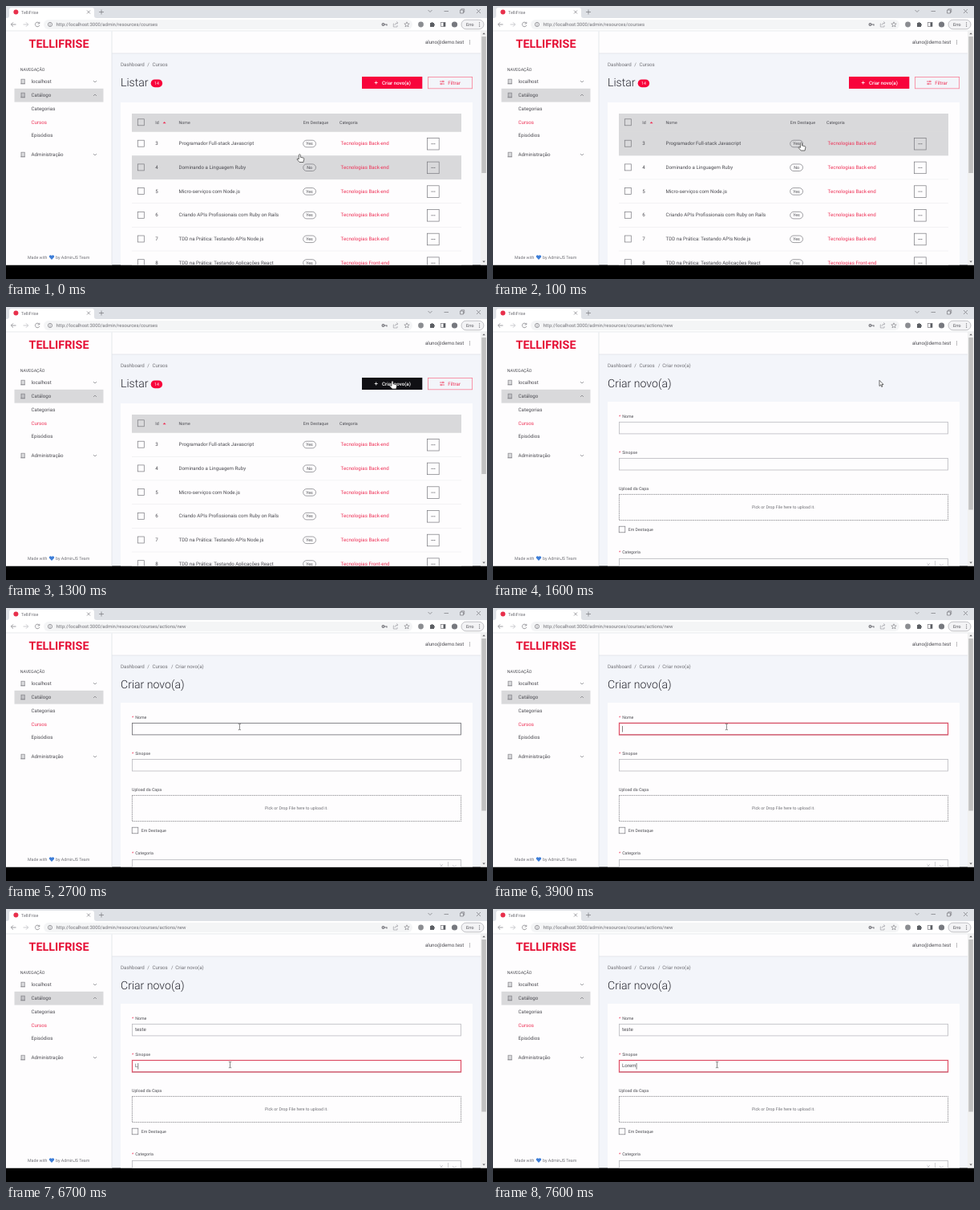
An HTML page for the animation above (8000 ms loop, 600 px wide and 340 px high).

```html
<!DOCTYPE html>
<html lang="pt">
<head>
<meta charset="utf-8">
<title>Cursos</title>
<style>
html, body { margin: 0; width: 100%; height: 100%; overflow: hidden; background: #000; }
svg { display: block; width: 600px; height: 340px; font: 6.16px Roboto, sans-serif; text-rendering: geometricPrecision; }
text { fill: #4c4c52; white-space: pre; }
.small { font-size: 5.28px; }
.title { font-size: 14.1px; font-weight: 300; fill: #26262e; }
.pale { fill: #707076; }
.red { fill: #ee3358; }
.mid { text-anchor: middle; }
.line { fill: none; stroke: #77777d; stroke-width: .7; }
.field { fill: #fefdfe; stroke: #b9b9bf; stroke-width: .8; }
.field.hover { stroke: #66666c; }
.ring { fill: none; stroke: #ee4560; }
.pointer { fill: #fff; stroke: #333; stroke-width: .7; stroke-linejoin: round; }
</style>
</head>
<body>
<svg viewBox="0 0 600 340">
  <defs>
    <clipPath id="view"><rect width="600" height="322.6"/></clipPath>
    <path id="down" class="line" d="M-2-1 0 1 2-1"/>
    <g id="doc" class="line"><rect x="-2" y="-2.8" width="4.2" height="5.6"/><path d="M-2-1H2M-2 1H2M-3 2.8H3" stroke-width=".5"/></g>
  </defs>
  <rect width="600" height="340"/>
  <g clip-path="url(#view)">
    <!-- browser window -->
    <rect width="600" height="323" fill="#f3f5fa"/>
    <rect width="600" height="16" fill="#dee1e6"/>
    <path d="M1 15Q4 15 4 12V5Q4 2 7 2H107Q110 2 110 5V12Q110 15 113 15Z" fill="#fff"/>
    <rect y="15" width="600" height="16" fill="#fff"/>
    <rect x="47" y="17" width="460" height="12" rx="6" fill="#f4f5f6"/>
    <path d="M0 31H600" stroke="#dcdde1" stroke-width=".7"/>
    <circle cx="12.4" cy="7.5" r="3" fill="#e8304c"/>
    <text class="pale" x="19" y="9.6" font-size="5.4">TelliFrise</text>
    <g class="line">
      <path d="M101 5.5 105 9.5M105 5.5 101 9.5M116 7.5H122M119 4.5V10.5"/>
      <path d="M526.5 5 529 7.5 531.5 5M546.5 6.5H552M566.5 5H570.5V9H566.5ZM567.8 5V3.8H571.7V7.7H570.5M587 4 592 9M592 4 587 9"/>
      <path d="M12.5 23H6.5M9 20.3 6.3 23 9 25.7"/>
      <path d="M21.5 23H27.5M25 20.3 27.7 23 25 25.7" stroke="#b5b7bb"/>
      <path d="M41.2 21A2.8 2.8 0 1 0 41.8 24M41.8 19.8V22H39.5"/>
      <circle cx="55" cy="23" r="2.6"/><path d="M55 22.5V24.6M55 21V21.7"/>
      <circle cx="470.5" cy="23" r="1.4" stroke-width="1.2"/><path d="M472 23H475V24.5" stroke-width="1.2"/>
      <path d="M484 22H483.3V26H488V24M485 24Q485 21 488.7 21M487.2 19.4 488.9 21 487.2 22.6" stroke="#a0a0a6"/>
      <path d="M500 19.8 500.9 22 503.2 22.1 501.4 23.6 502 25.9 500 24.6 498 25.9 498.6 23.6 496.8 22.1 499.1 22Z" stroke-width=".6"/>
      <rect x="542.5" y="20.5" width="5.5" height="5"/>
      <rect x="568" y="17.2" width="28" height="11.6" rx="5.8" fill="#f3f3f5" stroke="#a9a9af"/>
    </g>
    <circle cx="517.5" cy="23" r="3.4" fill="#8b8d91"/>
    <path d="M529 21H530.5A1 1 0 1 1 532.5 21H534V22.5A1 1 0 1 1 534 24.5V26H529Z" fill="#5c5f64"/>
    <path d="M545.5 20.5H548V25.5H545.5Z" fill="#5c5f64"/>
    <circle cx="559.5" cy="23" r="3.6" fill="#77797f"/>
    <text class="small" x="574" y="25">Erro</text>
    <g fill="#66666c"><circle cx="590.6" cy="20.8" r=".6"/><circle cx="590.6" cy="23" r=".6"/><circle cx="590.6" cy="25.2" r=".6"/></g>
    <text id="url" class="pale" x="62.5" y="25.1" font-size="5.96"></text>

    <!-- sidebar and top bar -->
    <path d="M0 31.4H592V59H132V323H0Z" fill="#fefdfe"/>
    <path d="M132 31.4V323M132 59H592" fill="none" stroke="#dfe1e8" stroke-width=".8"/>
    <text class="mid" x="66" y="51.5" font-size="14.4" font-weight="700" style="fill:#e50f35">TELLIFRISE</text>
    <text class="small" x="17.7" y="80.6">NAVEGAÇÃO</text>
    <rect x="10.5" y="102.8" width="111" height="16.8" fill="#d9d9db"/>
    <use href="#doc" x="21" y="94"/><use href="#doc" x="21" y="111"/><use href="#doc" x="21" y="185"/>
    <use href="#down" x="111" y="94"/><use href="#down" x="111" y="185"/>
    <path class="line" d="M109 112 111 110 113 112"/>
    <text x="31.6" y="96.1">localhost</text>
    <text x="31.6" y="113.1">Catálogo</text>
    <text x="31.6" y="129.9">Categorias</text>
    <text x="31.6" y="146.6" class="red">Cursos</text>
    <text x="31.6" y="163.4">Episódios</text>
    <text x="31.6" y="187.1">Administração</text>
    <text class="small pale" x="27" y="315.2">Made with</text>
    <path d="M57 316 54 312.8A1.7 1.7 0 0 1 57 311.2 1.7 1.7 0 0 1 60 312.8Z" fill="#3f7fd8"/>
    <text class="small pale" x="62" y="315.2">by AdminJS Team</text>
    <text x="571.3" y="47.2" text-anchor="end">aluno@demo.test</text>
    <g fill="#66666c"><circle cx="578.5" cy="43" r=".6"/><circle cx="578.5" cy="45" r=".6"/><circle cx="578.5" cy="47" r=".6"/></g>
    <text class="pale" x="143" y="75.3">Dashboard</text><text class="pale" x="176.2" y="75.3">/</text><text class="pale" x="182.4" y="75.3">Cursos</text>

    <g id="list">
      <text class="title" x="143" y="100.3">Listar</text>
      <rect x="180.7" y="91.4" width="14.4" height="9.8" rx="4.9" fill="#f8043b"/>
      <text class="small mid" x="187.9" y="98.1" style="fill:#fff">14</text>
      <rect id="create" x="444" y="88" width="75.3" height="15"/>
      <path d="M459.7 95.5H463.7M461.7 93.5V97.5" stroke="#fff" stroke-width=".8"/>
      <text x="469" y="97.6" font-weight="500" style="fill:#fff">Criar novo(a)</text>
      <rect x="526.4" y="88.4" width="55.2" height="14.4" fill="none" stroke="#f87f96" stroke-width=".8"/>
      <path d="M541 94H547M541 97H547M545 92.8V95.2M543 95.8V98.2" stroke="#ee3358" stroke-width=".7"/>
      <text class="red" x="551.2" y="97.6">Filtrar</text>
      <rect x="143" y="120" width="439" height="203" fill="#fefdfe"/>
      <rect x="157" y="134" width="411" height="23" fill="#d9d9db"/>
      <rect class="line" x="164.3" y="140.8" width="8" height="8"/>
      <text class="small" x="186.3" y="147.2">Id</text>
      <path d="M195.6 146.3H199.6L197.6 143.9Z" fill="#ee3358"/>
      <text class="small" x="215.5" y="147.2">Nome</text>
      <text class="small" x="370.8" y="147.2">Em Destaque</text>
      <text class="small" x="416" y="147.2">Categoria</text>
      <g id="rows"></g>
    </g>

    <g id="form">
      <text class="pale" x="206" y="75.3">/</text><text class="pale" x="211.2" y="75.3">Criar novo(a)</text>
      <text class="title" x="143" y="100.3">Criar novo(a)</text>
      <rect x="143" y="118" width="439" height="205" fill="#fefdfe"/>
      <g id="fields"></g>
      <text class="small" x="157" y="228.2">Upload da Capa</text>
      <rect x="157.4" y="233.4" width="410.2" height="32.2" fill="none" stroke="#66666c" stroke-width=".7" stroke-dasharray="1.4 .9"/>
      <text class="small mid pale" x="362.3" y="251.3">Pick or Drop File here to upload it.</text>
      <rect class="line" x="157.2" y="273.2" width="7.6" height="7.6"/>
      <text class="small" x="168.7" y="279">Em Destaque</text>
      <text class="small red" x="157" y="307.2">*</text><text class="small" x="161.2" y="307.2">Categoria</text>
      <rect class="field" x="157.4" y="313.4" width="410.2" height="15"/>
      <path d="M541.3 319 545 322.7M545 319 541.3 322.7M551.5 316V325M557 320 559.3 322.3 561.6 320" fill="none" stroke="#c4c4ca" stroke-width=".8"/>
    </g>

    <!-- scrollbar -->
    <rect x="592" y="31.4" width="8" height="292" fill="#f1f1f1"/>
    <rect id="thumb" x="593.3" y="38" width="5.6" fill="#c1c1c1"/>
    <path d="M594.3 35.2H597.9L596.1 33.2ZM594.3 317.5H597.9L596.1 319.5Z" fill="#66666a"/>

    <g id="cursor">
      <path id="hand" class="pointer" transform="translate(0 -2.5)" d="M-1 .8Q0-.7 1 .8V3.8L4.8 4.7Q5.6 5 5.5 6L4.7 10H-.2L-3.4 6.4Q-2.8 5-1 6.3Z"/>
      <path id="arrow" class="pointer" d="M0 0V7.2L1.7 5.6 2.8 8.2 3.9 7.7 2.8 5.2H5Z"/>
      <path id="beam" fill="none" stroke="#555" stroke-width=".7" d="M-1.6-3.8Q0-3.8 0-3Q0-3.8 1.6-3.8M0-3V3M-1.6 3.8Q0 3.8 0 3Q0 3.8 1.6 3.8"/>
    </g>
  </g>
</svg>
<script>
const $ = id => document.getElementById(id);
const show = (el, on) => el.setAttribute('opacity', +on);
const PERIOD = 8000, STEP = 100, FORM_AT = 1600;
const ROW_TOP = 156.8, ROW_H = 29.7;
const URL_BASE = 'http://localhost:3000/admin/resources/courses';

const courses = [
  ['Programador Full-stack Javascript', 'Yes', 'Back'],
  ['Dominando a Linguagem Ruby', 'No', 'Back'],
  ['Micro-serviços com Node.js', 'Yes', 'Back'],
  ['Criando APIs Profissionais com Ruby on Rails', 'Yes', 'Back'],
  ['TDD na Prática: Testando APIs Node.js', 'Yes', 'Back'],
  ['TDD na Prática: Testando Aplicações React', 'Yes', 'Front']
];
$('rows').innerHTML = courses.map(([name, featured, side], i) => `
  <g transform="translate(0 ${ROW_TOP + i * ROW_H})">
    <rect class="row" x="157" width="411" height="${ROW_H}"/>
    <path d="M157 ${ROW_H}H568" stroke="#dedee3" stroke-width=".7"/>
    <rect class="line" x="164.3" y="10.4" width="8" height="8"/>
    <text x="186.3" y="16.6">${i + 3}</text>
    <text x="215.5" y="16.6">${name}</text>
    <rect class="line" x="370.7" y="10.4" width="15.8" height="8.6" rx="4.3"/>
    <text class="small mid" x="378.6" y="16.6">${featured}</text>
    <text class="red" x="417.6" y="16.6">Tecnologias ${side}-end</text>
    <rect class="line" x="525.6" y="7.6" width="14.6" height="14.6"/>
    <path d="M530.5 14.9H535.5" stroke="#55555b" stroke-dasharray="1 .9"/>
  </g>`).join('');
const rows = [...document.querySelectorAll('.row')];

// Text fields: key press times, focus span and spans with the caret visible
const fields = [
  { label: 'Nome', y: 143.3, value: 'teste', keys: [4000, 4200, 4300, 4400, 4600],
    focus: [2900, 6000], caret: [[2900, 3300], [3900, 5300], [5800, 6000]] },
  { label: 'Sinopse', y: 188.4, value: 'Lorem', keys: [6700, 6900, 7100, 7400, 7500],
    focus: [6000, PERIOD], caret: [[6000, 6500], [6700, PERIOD]] }
];
$('fields').innerHTML = fields.map(({ label, y }) => `
  <g>
    <text class="small red" x="157" y="${y - 5.6}">*</text>
    <text class="small" x="161.2" y="${y - 5.6}">${label}</text>
    <rect class="field" x="157.4" y="${y}" width="410.2" height="14.6"/>
    <g class="ring">
      <rect x="157.4" y="${y}" width="410.2" height="14.6" stroke-width="2" opacity=".2"/>
      <rect x="157.4" y="${y}" width="410.2" height="14.6" stroke-width=".8"/>
    </g>
    <text class="value" x="161" y="${y + 9}"></text>
    <rect class="caret" y="${y + 3.6}" width=".6" height="7.6" fill="#333"/>
  </g>`).join('');
fields.forEach((f, i) => {
  const g = $('fields').children[i];
  for (const part of ['field', 'ring', 'value', 'caret']) f[part + 'El'] = g.querySelector('.' + part);
});

// Pointer moves: start, end, from, to
const moves = [
  [0, 400, [366.3, 187], [482, 94.5]],
  [1600, 2400, [482, 91.3], [292, 144.2]],
  [2400, 2700, [292, 144.2], [291.4, 148]],
  [5300, 5800, [291.4, 148], [279.5, 194]]
];
const clamp = v => Math.min(1, Math.max(0, v));
const ease = p => p * p * (3 - 2 * p);
const within = (t, [a, b]) => t >= a && t < b;

function pointerAt(t) {
  const [a, b, from, to] = moves.filter(m => m[0] <= t).pop();
  const p = ease(clamp((t - a) / (b - a)));
  return from.map((v, i) => v + (to[i] - v) * p);
}

function draw(t) {
  const [x, y] = pointerAt(t);
  const onForm = t >= FORM_AT;
  show($('list'), !onForm);
  show($('form'), onForm);
  $('url').textContent = URL_BASE + (onForm ? '/actions/new' : '');
  $('thumb').setAttribute('height', onForm ? 214.5 : 170);

  let kind = 'arrow';
  const hovered = Math.floor((y - ROW_TOP) / ROW_H);
  rows.forEach((r, i) => r.setAttribute('fill', i === hovered ? '#d9d9db' : '#fefdfe'));
  const onCreate = x > 444 && x < 519 && y > 88 && y < 103;
  $('create').setAttribute('fill', onCreate ? '#101014' : '#f8043b');
  if (!onForm && (hovered >= 0 || onCreate)) kind = 'hand';

  for (const f of fields) {
    const over = onForm && y > f.y && y < f.y + 14.6;
    if (over) kind = 'beam';
    f.fieldEl.classList.toggle('hover', over);
    const focused = within(t, f.focus);
    f.ringEl.setAttribute('opacity', focused ? clamp((t - f.focus[0] + 100) / 200) : 0);
    f.valueEl.textContent = f.value.slice(0, f.keys.filter(k => k <= t).length);
    f.caretEl.setAttribute('x', 161.2 + f.valueEl.getComputedTextLength());
    show(f.caretEl, f.caret.some(span => within(t, span)));
  }

  for (const k of ['hand', 'arrow', 'beam']) show($(k), k === kind);
  $('cursor').setAttribute('transform', `translate(${x} ${y})`);
}

const start = performance.now();
function tick() {
  const t = (performance.now() - start) % PERIOD;
  draw(Math.floor(t / STEP) * STEP);
  requestAnimationFrame(tick);
}
tick();
</script>
</body>
</html>
```
